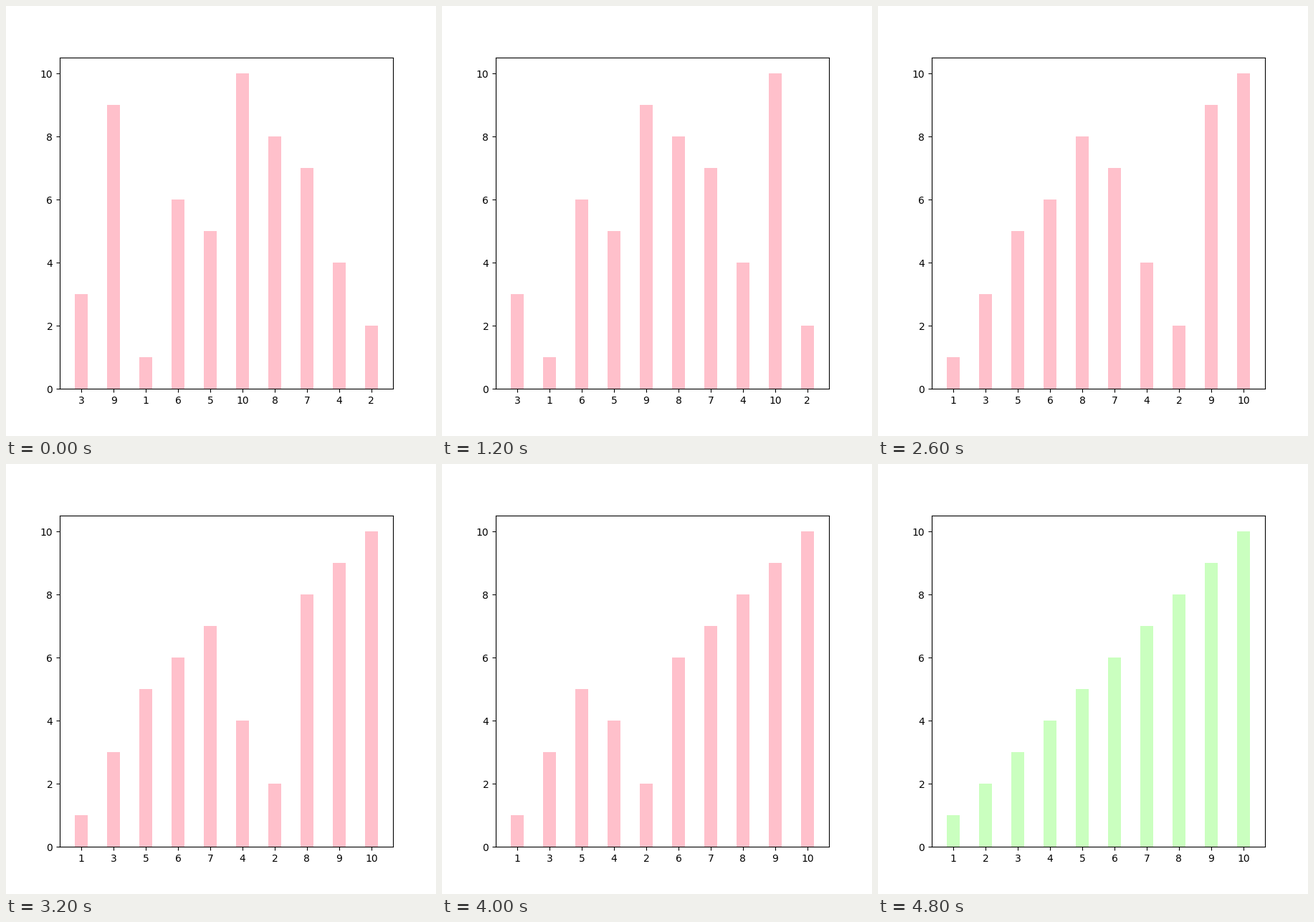
A matplotlib script that plays this animation: 600 px wide and 600 px high, repeating every 6000 ms.

```python
import matplotlib.pyplot as plt
from matplotlib.animation import FuncAnimation

VALUES = [3, 9, 1, 6, 5, 10, 8, 7, 4, 2]
FRAMES = 30
INTERVAL = 200
BUSY = "pink"
DONE = "#caffbf"


def bubble_steps(values):
    """Return the list after every swap of a bubble sort."""
    row = list(values)
    steps = [row[:]]
    for end in range(len(row) - 1, 0, -1):
        for i in range(end):
            if row[i] > row[i + 1]:
                row[i], row[i + 1] = row[i + 1], row[i]
                steps.append(row[:])
    return steps


steps = bubble_steps(VALUES)
last = len(steps) - 1

fig, ax = plt.subplots(figsize=(6, 6), dpi=100)
slots = range(len(VALUES))
bars = ax.bar(slots, VALUES, width=0.4, color=BUSY)
ax.set_xticks(slots, [str(v) for v in VALUES])
ax.set_ylim(0, 10.5)


def update(frame):
    step = min(frame, last)
    row = steps[step]
    for bar, value in zip(bars, row):
        bar.set_height(value)
        bar.set_facecolor(DONE if step == last else BUSY)
    ax.set_xticklabels([str(v) for v in row])
    return list(bars)


anim = FuncAnimation(fig, update, frames=FRAMES, interval=INTERVAL,
                     repeat=True, repeat_delay=0, blit=False)
plt.show()
```
